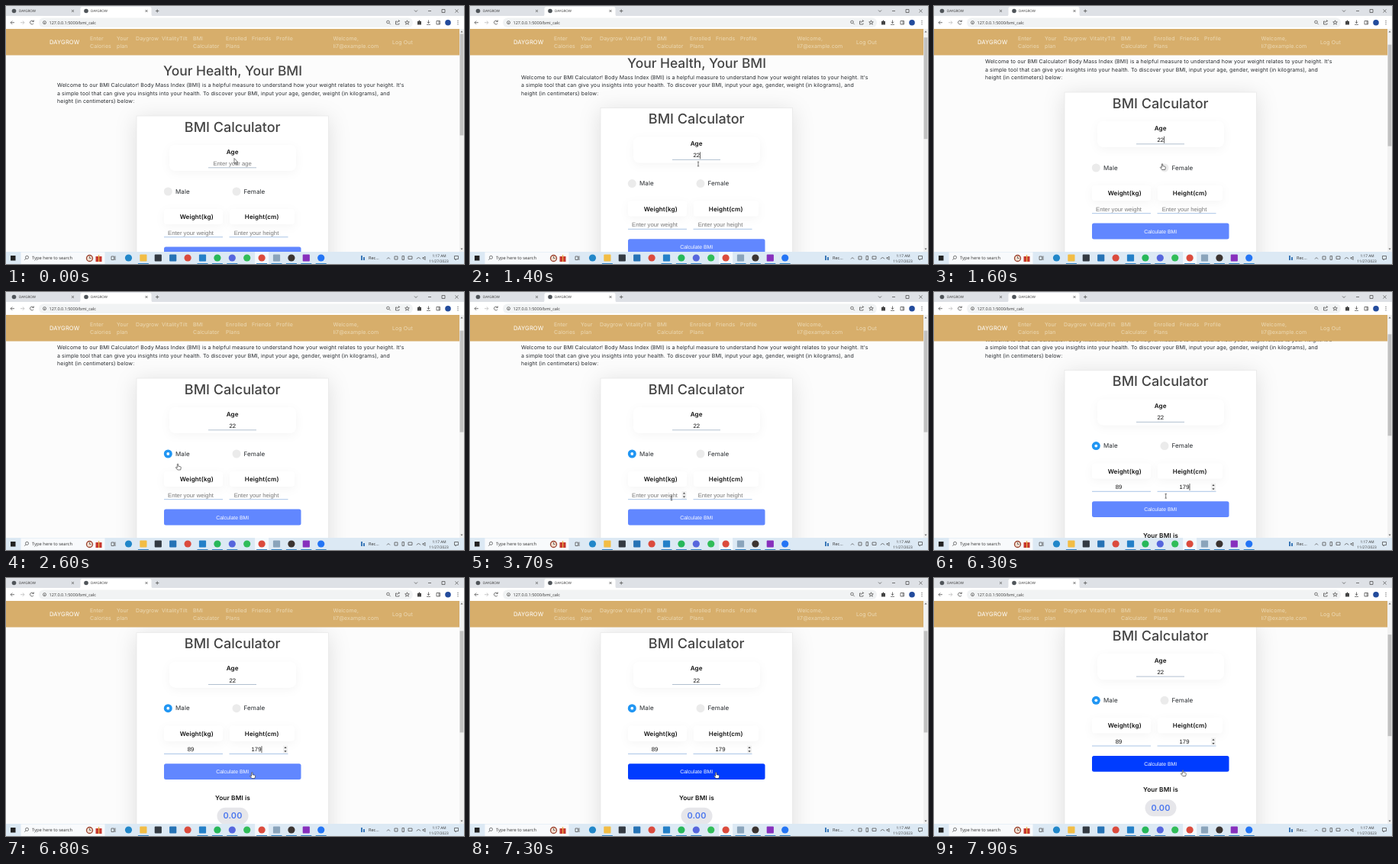
An HTML page for the animation above (8000 ms loop, 600 by 338 pixels).

```html
<!DOCTYPE html>
<html lang="en">
<head>
<meta charset="utf-8">
<title>BMI Calculator</title>
<style>
html, body { margin: 0; width: 100%; height: 100%; overflow: hidden; background: #fff; }
svg { display: block; }
text { font: 7px Inter, sans-serif; letter-spacing: .0137em; text-rendering: geometricPrecision; fill: #25292d; }
.mid { text-anchor: middle; }
.title { font-size: 17.4px; font-weight: 500; letter-spacing: 0; fill: #444; }
.label { font-size: 8.05px; font-weight: 600; fill: #111; }
.option { font-size: 8px; }
.field { font: 7.7px "Liberation Sans", Arial, sans-serif; letter-spacing: 0; fill: #111; text-anchor: middle; }
.field.empty { fill: #777; }
.links text { fill: #ecdab6; }
.ui text { font: 4.8px "Open Sans", sans-serif; letter-spacing: 0; fill: #333; }
.line { fill: none; stroke: #555; stroke-width: .8; }
.rule { stroke: #93b5e0; stroke-width: .8; }
.soft { fill: #fff; filter: drop-shadow(0 3px 6px rgba(0,0,0,.04)); }
.pointer { fill: #fff; stroke: #222; stroke-width: .6; stroke-linejoin: round; }
</style>
</head>
<body>
<svg width="600" height="338" viewBox="0 0 600 338">
  <rect width="600" height="338" fill="#fcfcfc"/>

  <g id="page">
    <text class="title mid" x="297" y="91">Your Health, Your BMI</text>
    <text x="67" y="106.2">Welcome to our BMI Calculator! Body Mass Index (BMI) is a helpful measure to understand how your weight relates to your height. It's</text>
    <text x="67" y="116.6">a simple tool that can give you insights into your health. To discover your BMI, input your age, gender, weight (in kilograms), and</text>
    <text x="67" y="127">height (in centimeters) below:</text>

    <rect x="171" y="144" width="251.5" height="290" fill="#fff" stroke="#e6e6e6" stroke-width=".7" style="filter:drop-shadow(0 4px 14px rgba(0,0,0,.12))"/>
    <text class="title mid" x="296.7" y="164.5" style="font-size:18px">BMI Calculator</text>

    <rect class="soft" x="214" y="182" width="166" height="34" rx="8"/>
    <text class="label mid" x="296.7" y="193.8">Age</text>
    <path class="rule" d="M265 211.8h63" style="stroke:#9fb0c4"/>
    <text class="field" id="age" x="296.7" y="208.9"></text>

    <circle id="male" cx="212.3" cy="243" r="5.5"/>
    <circle id="dot" cx="212.3" cy="243" r="1.9" fill="#fff"/>
    <text class="option" x="222" y="245.8">Male</text>
    <circle cx="302" cy="243" r="5.5" fill="#ebebeb"/>
    <text class="option" x="311.5" y="245.8">Female</text>

    <rect class="soft" x="207" y="266" width="77" height="20" rx="4"/>
    <rect class="soft" x="293" y="266" width="85" height="20" rx="4"/>
    <text class="label mid" x="249.7" y="279">Weight(kg)</text>
    <text class="label mid" x="335.2" y="279">Height(cm)</text>
    <path class="rule" d="M207 302.7h77M292.5 302.7h77"/>
    <text class="field" id="weight" x="242" y="299.6"></text>
    <text class="field" id="height" x="328" y="299.6"></text>
    <g id="spin">
      <rect x="-3" y="-5" width="6" height="10" fill="#efefef"/>
      <path d="M-1.6-1.6h3.2l-1.6-2zM-1.6 1.6h3.2l-1.6 2z" fill="#444"/>
    </g>
    <rect id="caret" width=".7" height="9" fill="#222"/>

    <rect id="button" x="207" y="315.6" width="179.5" height="20.8" rx="2.5"/>
    <text class="field" x="296.7" y="328.6" style="font-size:6.9px;fill:#fff">Calculate BMI</text>

    <text class="label mid" x="297" y="363.2" style="font-size:8.3px">Your BMI is</text>
    <rect x="276.5" y="373" width="41" height="22" rx="11" fill="#e6e6ea"/>
    <text class="label mid" x="297" y="387.8" style="font-size:10.9px;fill:#4a76ee">0.00</text>
  </g>

  <g class="links">
    <rect y="29" width="594" height="35.5" fill="#d7ae6b"/>
    <text x="57" y="49.8" style="font-size:7.6px;fill:#fff">DAYGROW</text>
    <text x="110" y="44.6">Enter</text><text x="110" y="54.9">Calories</text>
    <text x="145" y="44.6">Your</text><text x="145" y="54.9">plan</text>
    <text x="170" y="44.6">Daygrow</text>
    <text x="204" y="44.6">VitalityTilt</text>
    <text x="245" y="44.6">BMI</text><text x="245" y="54.9">Calculator</text>
    <text x="288" y="44.6">Enrolled</text><text x="288" y="54.9">Plans</text>
    <text x="322" y="44.6">Friends</text>
    <text x="354" y="44.6">Profile</text>
    <text x="428.5" y="44.6">Welcome,</text><text x="428.5" y="54.9">li7@example.com</text>
    <text x="506" y="49.6">Log Out</text>
  </g>

  <rect x="594" y="30" width="6" height="292" fill="#f1f1f1"/>
  <path d="M595.5 34.5h3l-1.5-2zM595.5 317.5h3l-1.5 2z" fill="#666"/>
  <rect id="thumb" x="594.6" width="4.8" height="133" fill="#c1c1c1"/>

  <g class="ui">
    <rect width="600" height="14" fill="#dee1e6"/>
    <path d="M95 13.5q2.5 0 2.5-3V3.5q0-2.5 2.5-2.5h88q2.5 0 2.5 2.5v7q0 3 2.5 3z" fill="#fff"/>
    <circle cx="10.5" cy="6.5" r="2.8" fill="#50555a"/><circle cx="105" cy="6.5" r="2.8" fill="#50555a"/>
    <text x="17" y="8.3" style="font-size:4.5px">DAYGROW</text><text x="111" y="8.3" style="font-size:4.5px">DAYGROW</text>
    <path class="line" d="M86 5l3 3m0-3l-3 3M182.5 5l3 3m0-3l-3 3M196 6.5h4.4m-2.2-2.2v4.4M535 5.5l2 2 2-2M553 6.5h4M571 4.5h4v4h-4zM588.5 4.5l4 4m0-4l-4 4"/>
    <rect y="13" width="600" height="17" fill="#fff"/>
    <rect x="43" y="15.5" width="490" height="12.5" rx="6.2" fill="#f1f3f4"/>
    <path class="line" d="M11 21.7H6m2.2-2.2L6 21.7l2.2 2.2M35.8 20a2.4 2.4 0 1 0 .3 2.6M36.3 18.5v2h-2"/>
    <path class="line" d="M19 21.7h5m-2.2-2.2l2.2 2.2-2.2 2.2" style="stroke:#bbb"/>
    <circle class="line" cx="50.5" cy="21.7" r="2"/><path class="line" d="M50.5 21.3v1.5"/>
    <text x="56.5" y="23.7" style="font-size:5.5px">127.0.0.1:5000/bmi_calc</text>
    <circle class="line" cx="500.5" cy="21" r="1.8"/>
    <path class="line" d="M502 22.5l1.7 1.7M512 20h-1.5v4h4.5v-1.5M512 22q.5-2.5 3.5-2.5m-1.2-1.2l1.3 1.3-1.3 1.3M525.5 18.8l.8 2 2 .1-1.6 1.3.6 2-1.8-1.2-1.8 1.2.6-2-1.6-1.3 2-.1zM553.5 18.5v4m-1.6-1.7l1.6 1.7 1.6-1.7M551 24.3h5M564 19.5h4.5v4.500H564zM567 19.5v4.5"/>
    <path d="M513.5 0" fill="none"/>
    <path d="M539 20h1.5q0-1.5 1-1.5t1 1.5h1.5v4.5h-5z" fill="#444"/>
    <circle cx="551" cy="21.7" r="0" fill="none"/>
    <circle cx="579" cy="21.7" r="3.8" fill="#234b9c"/>
    <path d="M591.5 19h1v1h-1zm0 2.2h1v1h-1zm0 2.2h1v1h-1z" fill="#444"/>

    <rect y="322" width="600" height="16" fill="#dce9f4"/>
    <rect x="6" y="327" width="6.5" height="6.5" fill="#222"/>
    <rect x="19.5" y="322.5" width="110" height="15.5" fill="#f8fafc"/>
    <circle class="line" cx="27.5" cy="329.3" r="2"/><path class="line" d="M26 330.8l-1.8 1.9"/>
    <text x="34" y="332.2" style="font-size:5.8px">Type here to search</text>
    <circle cx="109.5" cy="330.5" r="4" fill="#f2dfd0" stroke="#9c4330" stroke-width="1.3"/>
    <path class="line" d="M109.5 328v2.5h2"/>
    <path d="M117.5 328h8v7h-8z" fill="#c8382e"/><path d="M121 326h1.2v9H121z" fill="#e9b34a"/>
    <path class="line" d="M138 328h3.5v4.5H138zM143 327.5v5.5"/>
    <g id="apps"></g>
    <path d="M465 327h2v6h-2zm3 2h2v4h-2z" fill="#3b78b8"/>
    <text x="475" y="332" style="font-size:5.6px">Rec...</text>
    <path class="line" d="M499 331.5l2-2 2 2M509 328h4v4h-4zM519 327.5h2.5v5H519zM527 328h5v3.5h-5zM538 331.5q2.5-4 5 0M546 329.5h1.5l1.5-1.5v4.5l-1.5-1.5H546zM587.5 327.5h5v4H590l-1 1.5v-1.5h-1.5z"/>
    <text class="mid" x="567.5" y="329.2">1:17 AM</text>
    <text class="mid" x="567" y="336">11/27/2023</text>
  </g>

  <g id="mouse">
    <path class="pointer" id="arrow" d="M0 0v7l1.6-1.5 1.2 2.6 1.1-.5-1.2-2.500h2.2z"/>
    <path class="line" id="beam" d="M-1.2-2.8h2.4M0-2.8v5.6M-1.2 2.8h2.4"/>
    <path class="pointer" id="hand" d="M-.7.5Q0-.5.7.5v2.7l2.8.6q.9.3.8 1.2l-.6 3H-.2l-2.5-3q.3-1 1.2-.3l.8.6z"/>
  </g>
</svg>
<script>
const $ = id => document.getElementById(id);
const set = (id, attrs) => { for (const k in attrs) $(id).setAttribute(k, attrs[k]); };
const show = (id, on) => set(id, { visibility: on ? 'visible' : 'hidden' });

// Latest value whose start time has passed.
const step = (keys, t) => keys.filter(k => k[0] <= t).pop()[1];

// Linear interpolation between [time, ...values] keys.
function tween(keys, t) {
  const i = keys.findIndex(k => k[0] > t);
  if (i < 0) return keys[keys.length - 1].slice(1);
  const a = keys[i - 1], b = keys[i], p = (t - a[0]) / (b[0] - a[0]);
  return a.slice(1).map((v, n) => v + (b[n + 1] - v) * p);
}

const scrolls = [[0, 0], [1300, 0], [1400, 10.4], [1600, 31], [6200, 31], [6300, 41.4], [6400, 62], [6500, 72.3], [7800, 72.3], [7900, 82.7]];
const moves = [[0, 299, 199.5], [200, 299, 199.5], [300, 299, 207], [1500, 299, 207], [1600, 299, 206.5],
  [1900, 299, 206.5], [2200, 212, 210], [2500, 212, 210], [2900, 264, 270], [4400, 264, 270], [4800, 303.7, 267.3],
  [6600, 303.7, 267.3], [6800, 322.3, 254.5], [7600, 322.3, 254.5], [7800, 326, 251.5]];
const shapes = [[0, 'arrow'], [300, 'beam'], [1500, 'hand'], [2700, 'arrow'], [2900, 'beam'], [4600, 'arrow'], [4800, 'beam'], [6400, 'arrow'], [6700, 'hand']];
const focus = [[0, ''], [100, 'age'], [2200, ''], [3200, 'weight'], [3700, ''], [3800, 'weight'], [4900, 'height'], [7300, '']];
const fields = {
  age: [[0, ''], [1000, '2'], [1100, '22']],
  weight: [[0, ''], [3800, '8'], [4000, '89']],
  height: [[0, ''], [5300, '1'], [5600, '17'], [5900, '179']]
};

const apps = ['c#2187c9', 's#f2bd45', 's#333a42', 's#2673b5', 'c#db4b3d', 's#2480c8', 'c#27b85a',
  'c#5666dd', 'c#31bd59', 'c#db4b3d', 's#8aa4bb', 'c#3b3431', 's#8730bd', 'c#2475f5'];
$('apps').innerHTML = apps.map((a, i) => {
  const x = 160.5 + i * 19.4, r = a[0] === 'c' ? 4.6 : 1;
  const active = i === 9 ? `<rect x="${x - 9}" y="322" width="18" height="16" fill="#f4f9fd"/>` : '';
  const bar = i === 1 || i > 4 && i !== 8 ? `<rect x="${x - 7}" y="337" width="14" height="1" fill="#3383c4"/>` : '';
  return `${active}<rect x="${x - 4.6}" y="325.4" width="9.2" height="9.2" rx="${r}" fill="${a.slice(1)}"/>${bar}`;
}).join('');

function draw(now) {
  const t = Math.floor(now % 8000 / 100) * 100;
  const [scroll] = tween(scrolls, t), [x, y] = tween(moves, t);
  set('page', { transform: `translate(0 ${-scroll})` });
  set('thumb', { y: 36.5 + scroll * .455 });

  for (const id in fields) {
    const value = step(fields[id], t);
    $(id).textContent = value || 'Enter your ' + id;
    $(id).classList.toggle('empty', !value);
  }

  const active = step(focus, t);
  show('caret', active);
  if (active) {
    const el = $(active), width = step(fields[active], t).length * 4.28;
    set('caret', { x: +el.getAttribute('x') + width / 2 + .2, y: el.getAttribute('y') - 7.2 });
  }
  show('spin', t >= 2900);
  set('spin', { transform: `translate(${t < 4800 ? 280.5 : 366} 297)` });

  const male = t >= 2300;
  set('male', { fill: male ? '#2196f3' : '#ebebeb' });
  show('dot', male);

  const [r, g, b] = tween([[0, 97, 135, 255], [6800, 97, 135, 255], [7300, 0, 60, 255]], t);
  set('button', { fill: `rgb(${r},${g},${b})` });

  set('mouse', { transform: `translate(${x} ${y})` });
  for (const id of ['arrow', 'beam', 'hand']) show(id, id === step(shapes, t));
  requestAnimationFrame(draw);
}
requestAnimationFrame(draw);
</script>
</body>
</html>
```
